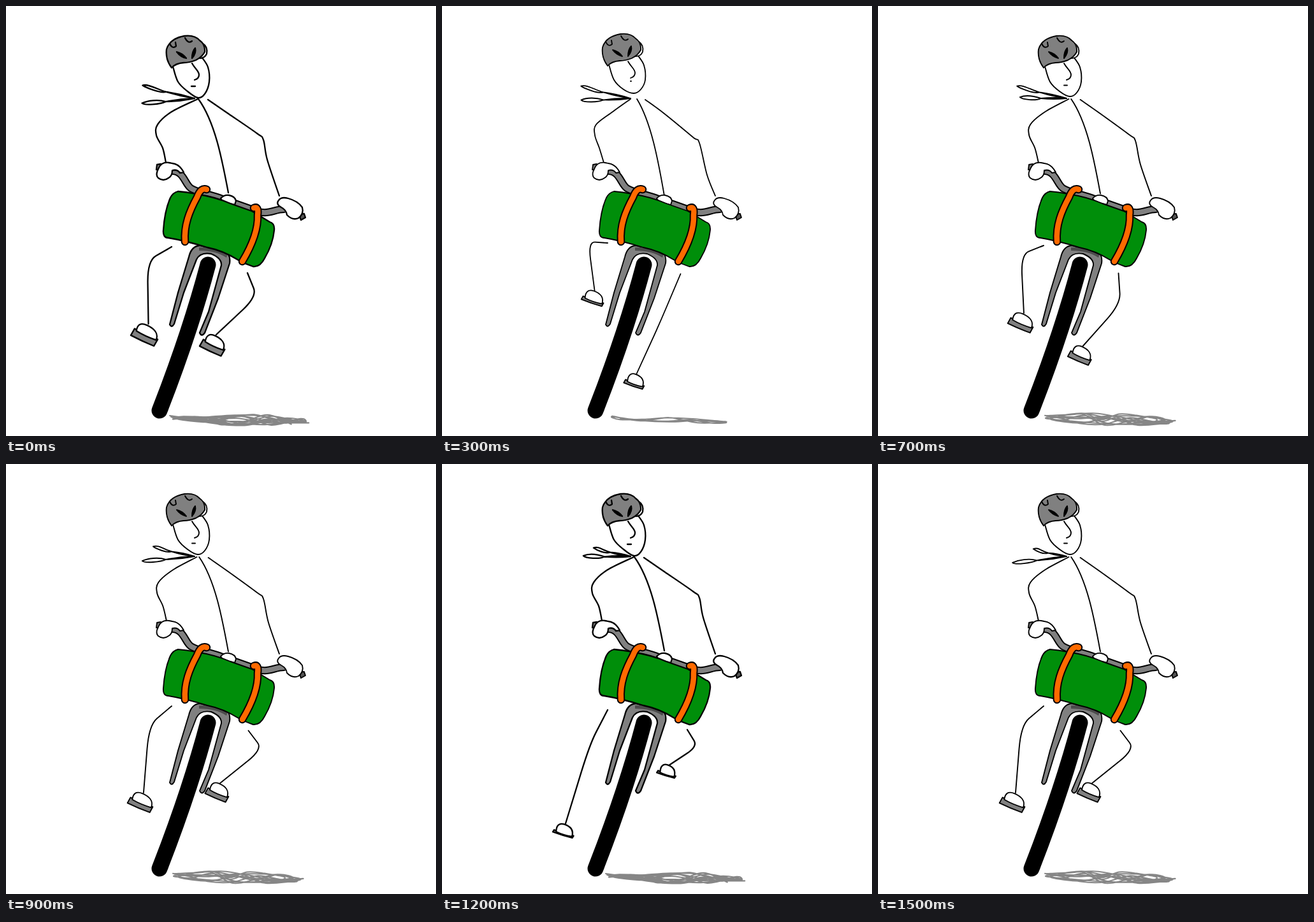
An HTML page for the animation above (1600 ms loop, 675 by 675 pixels).

```html
<!DOCTYPE html>
<html lang="en">
<head>
<meta charset="utf-8">
<title>Cyclist</title>
<style>
  html, body { margin: 0; width: 100%; height: 100%; overflow: hidden; background: #fff; }
  svg { display: block; width: 100vw; height: 100vh; }
  path { stroke: #000; stroke-width: var(--pen); stroke-linecap: round; stroke-linejoin: round; }
  .line { fill: none; }
  .white { fill: #fff; }
  .gray { fill: #808080; }
  .green { fill: #008e0a; }
  #shadow { stroke: #868686; stroke-width: 2.1; }
</style>
</head>
<body>
<svg viewBox="0 0 675 675">
  <path id="shadow" class="line"/>
  <path id="legL" class="line"/>
  <path id="legR" class="line"/>
  <path id="armL" class="line"/>
  <path id="armR" class="line"/>
  <path id="torso" class="line"/>

  <path class="gray" d="M257 500 L270 450 L287 394 Q291 377 304 376 L344 385 Q353 390 351 404 L333 459 L312 513 Q307 520 304 513 L318 480 L338 407 Q339 396 322 389 Q305 386 299 398 L279 450 L264 499 Q260 506 257 500Z"/>
  <path d="M303 379 L320 379 L348 389 L346 395 Q330 384 303 384Z" style="fill:#4c4c4c;stroke:none"/>
  <path class="line" d="M317 406 Q289 512 241 635" style="stroke-width:25"/>

  <g id="bar"></g>
  <path class="white" d="M337 302 Q342 296 350 297 Q360 299 361 306 L359 312 L340 307Z"/>
  <path class="green" d="M270 291 Q284 292 298 295 Q330 300 352 310 L386 322 L414 339 Q422 341 421 352 Q419 374 406 396 Q399 410 388 409 Q376 405 365 399 Q341 384 316 379 Q280 368 255 364 Q246 364 247 352 Q249 321 258 301 Q262 293 270 291Z"/>
  <g id="straps"></g>

  <path class="gray" d="M237 249 L243 248 L243 257 L236 257Z"/>
  <path class="white" d="M239 256 Q234 265 239 270 Q247 276 255 270 Q261 267 261 258 Q269 256 273 262 L279 261 Q272 248 261 247 Q244 242 239 256Z"/>
  <path d="M460 327 L468 326 L470 332 L463 336Z" fill="#555"/>
  <path class="white" d="M428 305 Q432 299 443 302 Q458 306 465 316 Q468 326 459 333 Q450 337 441 328 Q440 320 432 316 Q423 311 428 305Z"/>
  <g id="footL"><path class="gray"/><path class="white"/></g>
  <g id="footR"><path class="gray"/><path class="white"/></g>

  <g id="head">
    <path id="face" class="white"/>
    <path class="white" d="M309 59 Q317 64 315 75 Q312 82 304 82Z"/>
    <path class="gray" d="M260 97 Q250 84 252 68 Q257 51 280 47 Q296 45 304 54 Q313 60 312 72 Q308 80 298 85 Q288 89 279 89 Q266 90 260 97Z"/>
    <path class="line" d="M257 59 Q261 68 267 63 L266 57 M281 50 Q286 60 292 55"/>
    <path d="M268 72 Q277 74 283 82 Q274 80 268 72Z M292 82 Q292 71 297 66 Q299 74 292 82Z"/>
    <path class="line" d="M292 90 C297 99 303 102 303 108 Q303 114 296 116"/>
    <path id="mouth" class="line"/>
  </g>
  <path id="tail1" class="line"/>
  <path id="tail2" class="line"/>
</svg>
<script>
const STEP = 100, COUNT = 16, KNOT = [296, 145];
const el = id => document.getElementById(id);
const draw = (id, d) => el(id).setAttribute('d', d);
const mix = (a, b, k) => a.map((v, i) => v + (b[i] - v) * k);
const move = ([x, y], dx, dy) => [x + dx, y + dy];
const wave = (turns, step, peak) => Math.cos(2 * Math.PI * turns * (step - peak) / COUNT);

// Smooth line through a few points.
function curve(p) {
  let d = 'M' + p[0];
  for (let i = 0; i < p.length - 1; i++) {
    const a = p[i - 1] || p[i], b = p[i], c = p[i + 1], e = p[i + 2] || c;
    const out = b.map((v, n) => v + (c[n] - a[n]) / 6);
    const back = c.map((v, n) => v - (e[n] - b[n]) / 6);
    d += `C${out} ${back} ${c}`;
  }
  return d;
}

// Outlined tube: a wide black stroke under a coloured one.
function tube(id, d, width, color) {
  const path = (w, c) => `<path class="line" d="${d}" style="stroke:${c};stroke-width:${w}"/>`;
  el(id).innerHTML += path(width, '#000') + path(width - 4, color);
}

function random(seed) {
  return () => (seed = seed * 16807 % 2147483647) / 2147483647;
}

// Pencil strokes running back and forth between two ends.
function scribble({ seed, from, to, strokes, spread }) {
  const rnd = random(seed), points = [];
  for (let i = 0; i < strokes; i++) {
    const inset = i ? rnd() * .3 : 0;
    for (let j = 0; j <= 4; j++) {
      const along = inset + (1 - inset * 1.6) * j / 4;
      const u = i % 2 ? 1 - along : along;
      const y = 646 + 6 * u + (rnd() - .5) * spread * (.5 + Math.sin(Math.PI * u));
      points.push([from + (to - from) * u, y]);
    }
  }
  return curve(points);
}

// Hand-drawn moods of the figure; sway shifts the arms from 0 to 1.
const wide = { pen: 2.3, sway: 0, chin: 144, smile: 6, seed: 4711, from: 257, to: 475, strokes: 13, spread: 13 };
const rough = { pen: 1.9, sway: .3, chin: 142, smile: 5, seed: 977, from: 262, to: 463, strokes: 12, spread: 13 };
const thin = { pen: 1.8, sway: 1, chin: 140, smile: 1, seed: 52, from: 267, to: 446, strokes: 4, spread: 9 };
const moods = [wide, rough, thin, thin, wide];

function drawBody({ sway: s, chin, smile }) {
  draw('armL', curve([[301 - 5 * s, 146], [260 + 8 * s, 166], [238 + 4 * s, 186], [236 + 4 * s, 203], [246 + s, 223], [251 + 3 * s, 246]]));
  draw('armR', curve([[317 + 2 * s, 147], [349, 169], [394, 200 + 6 * s], [404, 210 + 5 * s], [410 + 6 * s, 241 + 24 * s], [429, 298]]));
  draw('torso', `M${302 + 4 * s} 146C328 182 339 240 349 ${293 + 5 * s}`);
  draw('face', curve([[262, 95], [270, 119], [285, 134], [301, chin], [312, chin - 6], [319, 119], [317, 96], [307, 80]]));
  draw('mouth', `M${297 - smile} ${126 - 5 * s}h${smile}`);
}

function drawLeg(side, hip, knee, foot, length, phase) {
  const off = Math.abs(phase), w = length - 2 * off, t = 12 - 2.1 * off;
  const ankle = move(foot, w * .55, -7);
  draw('leg' + side, `M${hip}L${mix(knee, hip, .35)}Q${knee} ${mix(knee, ankle, .35)}L${ankle}`);
  const shape = el('foot' + side), [pedal, shoe] = shape.children;
  shape.setAttribute('transform', `translate(${foot}) rotate(${25 - 2 * off})`);
  pedal.setAttribute('d', `M1 0Q${w / 2} 2 ${w} 0L${w - 1} ${t}Q${w / 2} ${t + 1} 0 ${t}Z`);
  shoe.setAttribute('d', `M5 2C2 -8 6 -13 ${w * .4} -13C${w * .7} -13 ${w - 2} -9 ${w - 2} 2Q${w / 2} 4 5 2Z`);
}

// Both feet travel steadily; the right knee folds as it rises.
function drawLegs(p) {
  const bend = p * p;
  drawLeg('L', [260, 378 - 2 * p], [222 + 2.5 * Math.abs(p), 400 - 10 * p],
    [201 + 6.5 * p, 506 - 17 * p], 41, p);
  drawLeg('R', [379 - 1.5 * p, 419 + .5 * p], [394 - 11 * p - 2.3 * bend, 456 + 10 * p + 1.7 * bend],
    [309 - 7.3 * p, 523 + 16.5 * p + 1.5 * bend], 38, p);
}

// A thin stem that ends in a narrow leaf.
function tail(tip, bulge) {
  const neck = move(mix(tip, KNOT, .45), 0, 1);
  return `M${KNOT}Q${move(mix(neck, KNOT, .5), 0, 2)} ${neck}`
    + `C${move(neck, -12, -bulge)} ${move(tip, 9, -bulge)} ${tip}`
    + `C${move(tip, 4, bulge)} ${move(neck, -8, bulge)} ${neck}`
    + `Q${move(mix(neck, KNOT, .5), 0, -2)} ${KNOT}`;
}

function drawScarf(step) {
  const reach = 18 * wave(5, step, 13), dip = 6 * wave(3, step, 15.2);
  draw('tail1', tail([231 - reach, 129.5 - reach * .3], 3));
  draw('tail2', tail([217 - dip, 149 + dip], 4));
}

function render(step) {
  const phase = step <= 4 ? step : step <= 12 ? 8 - step : step - 16;
  const beat = step % 8, mood = moods[Math.min(beat, 8 - beat)];
  document.documentElement.style.setProperty('--pen', mood.pen);
  draw('shadow', scribble(mood));
  drawBody(mood);
  drawLegs(phase);
  drawScarf(step);
  el('head').setAttribute('transform', `translate(0 ${beat === 3 ? -3 : 0})`);
}

let start, shown = -1;
function tick(now) {
  if (start === undefined) start = now;
  const step = Math.floor((now - start) / STEP) % COUNT;
  if (step !== shown) render(shown = step);
  requestAnimationFrame(tick);
}

tube('bar', 'M262 259C279 260 281 280 290 286C300 293 320 295 340 303L388 320C410 330 420 319 436 319', 12, '#808080');
tube('straps', 'M315 288Q306 284 300 300C288 322 279 344 281 370', 12.5, '#ff6a00');
tube('straps', 'M389 317Q397 314 395 328C396 350 386 376 371 401', 12.5, '#ff6a00');
render(0);
requestAnimationFrame(tick);
</script>
</body>
</html>
```
